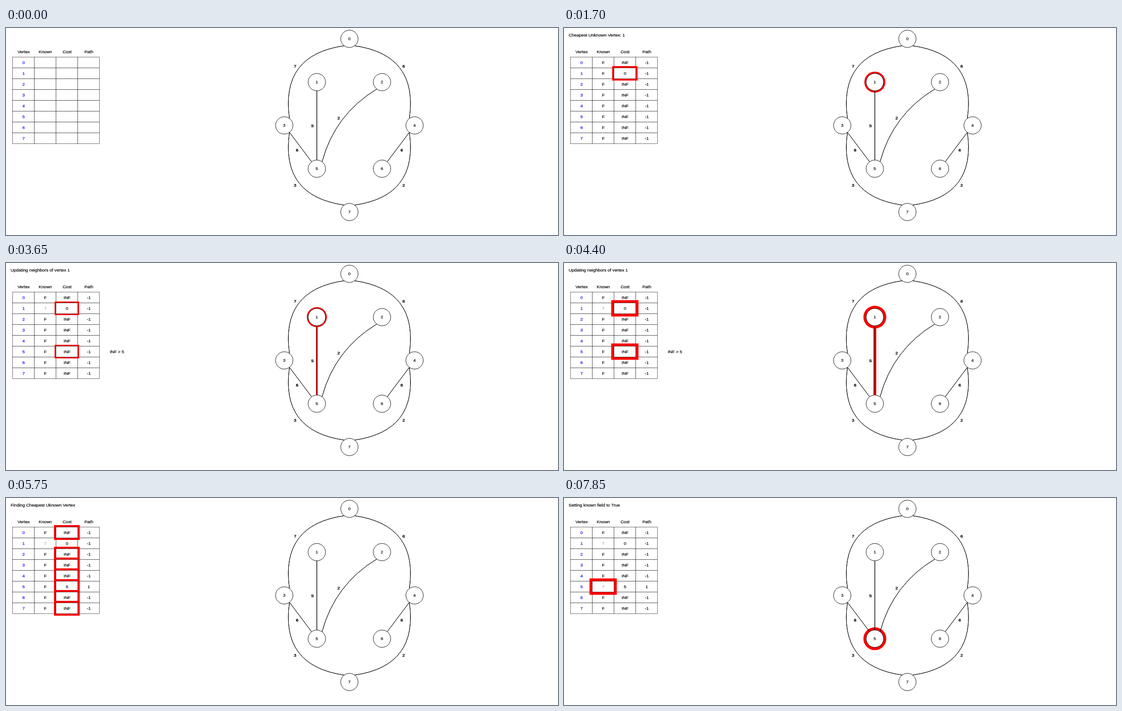
An HTML page with a canvas that plays this animation: 1220x459 px, repeating every 8 s.

```html
<!DOCTYPE html>
<html lang="en">
<head>
<meta charset="utf-8">
<title>Shortest path walkthrough</title>
<style>
  html, body { margin: 0; width: 100%; height: 100%; overflow: hidden; background: #fff; }
  canvas { display: block; }
</style>
</head>
<body>
<canvas id="stage" width="1220" height="459"></canvas>
<script>
const ctx = document.getElementById('stage').getContext('2d');

const LOOP = 8000, FIRST_TICK = 500, TICK = 150;
const PULSE = { period: 1720, peak: 1100, min: 3, max: 7 };
const SCALE = 0.96, RADIUS = 20 * SCALE;
const CELL = { x: 14.5, y: 64.5, w: 48, h: 24, line: 0.6 };
const KNOWN = 1, COST = 2;
const HEADERS = ['Vertex', 'Known', 'Cost', 'Path'];

const VERTICES = [[759, 24], [687, 120], [831, 120], [615, 216],
                  [903, 216], [687, 312], [831, 312], [759, 408]];

// from, to, weight, bend of the curve, side of the label
const EDGES = [
  [0, 3, 7, 0.5, 1], [0, 4, 6, -0.5, -1], [1, 5, 5, 0, 1], [2, 5, 2, 0.2, 1],
  [3, 5, 6, 0, 1], [3, 7, 3, 0.5, 1], [4, 6, 6, 0, -1], [4, 7, 2, -0.5, -1],
];

const costCells = rows => rows.map(row => [row, COST]);

const STEPS = [
  { at: 0, cells: [] },
  { at: 500, message: 'Finding Cheapest Uknown Vertex', cells: costCells([0, 1, 2, 3, 4, 5, 6, 7]) },
  { at: 1550, message: 'Cheapest Unknown Vertex: 1', cells: [[1, COST]], vertex: 1 },
  { at: 2600, message: 'Setting known field to True', cells: [[1, KNOWN]], vertex: 1, known: [1] },
  { at: 3650, message: 'Updating neighbors of vertex 1', cells: costCells([1, 5]), vertex: 1,
    known: [1], edge: 2, note: 'INF > 5' },
  { at: 4850, message: 'Finding Cheapest Uknown Vertex', cells: costCells([0, 2, 3, 4, 5, 6, 7]),
    known: [1], updated: true },
  { at: 5900, message: 'Cheapest Unknown Vertex: 5', cells: [[5, COST]], vertex: 5,
    known: [1], updated: true },
  { at: 6950, message: 'Setting known field to True', cells: [[5, KNOWN]], vertex: 5,
    known: [1, 5], updated: true },
];

function text(value, x, y, color = '#000', align = 'center') {
  ctx.save();
  ctx.fillStyle = ctx.strokeStyle = color;
  ctx.lineWidth = 0.2;
  ctx.textAlign = align;
  ctx.fillText(value, x, y + 3.4);
  ctx.strokeText(value, x, y + 3.4);
  ctx.restore();
}

function pulseAt(time) {
  const { period, peak, min, max } = PULSE;
  const phase = (((time - peak) % period) + period) % period;
  const distance = Math.min(phase, period - phase) / (period / 2);
  return (max - (max - min) * distance) * SCALE;
}

function cellText(row, col, step) {
  if (col === 0) return row;
  if (!step.message) return '';
  if (col === KNOWN) return step.known?.includes(row) ? 'T' : 'F';
  if (col === COST) return row === 1 ? 0 : row === 5 && step.updated ? 5 : 'INF';
  return row === 5 && step.updated ? 1 : '-1';
}

function drawCell(row, col, step, glow = 0) {
  const { w, h } = CELL, x = CELL.x + col * w, y = CELL.y + row * h;
  if (glow) {
    ctx.fillStyle = '#f00';
    ctx.fillRect(x - glow, y - glow, w + 2 * glow, h + 2 * glow);
  }
  ctx.fillStyle = '#fff';
  ctx.fillRect(x, y, w, h);
  ctx.lineWidth = CELL.line;
  ctx.strokeRect(x, y, w, h);
  const value = cellText(row, col, step);
  const color = col === 0 ? '#00f' : value === 'T' ? '#aaa' : '#000';
  text(value, x + w / 2 + 0.5, y + h / 2 + 0.5, color);
}

function disc(x, y, r, color) {
  ctx.beginPath();
  ctx.arc(x, y, r, 0, 2 * Math.PI);
  ctx.fillStyle = color;
  ctx.fill();
}

function drawVertex(index, glow) {
  const [x, y] = VERTICES[index];
  if (glow) disc(x, y, RADIUS + glow, '#f00');
  disc(x, y, RADIUS, '#fff');
  ctx.lineWidth = SCALE;
  ctx.stroke();
  text(index, x, y);
}

function drawEdge([from, to, weight, bend, side], glow) {
  const [ax, ay] = VERTICES[from], [bx, by] = VERTICES[to];
  const length = Math.hypot(bx - ax, by - ay);
  const ux = (bx - ax) / length, uy = (by - ay) / length;
  const span = length - 2 * RADIUS;
  const midX = (ax + bx) / 2, midY = (ay + by) / 2;
  const path = new Path2D();
  path.moveTo(ax + ux * RADIUS, ay + uy * RADIUS);
  path.quadraticCurveTo(midX - uy * span * bend, midY + ux * span * bend,
                        bx - ux * RADIUS, by - uy * RADIUS);
  const offset = span * bend / 2 + side * 10 * SCALE;

  // Each undirected edge is a pair of overlapping lines with their labels.
  for (let pass = 0; pass < 2; pass++) {
    if (glow) {
      ctx.strokeStyle = '#f00';
      ctx.lineWidth = glow;
      ctx.stroke(path);
    }
    ctx.strokeStyle = '#000';
    ctx.lineWidth = SCALE;
    ctx.stroke(path);
    text(weight, midX - uy * offset, midY + ux * offset + 1);
  }
}

function draw(time) {
  const tick = time < FIRST_TICK ? 0
    : FIRST_TICK + TICK * Math.floor((time - FIRST_TICK) / TICK);
  const step = STEPS.findLast(s => s.at <= tick);
  const glow = pulseAt(tick);

  ctx.fillStyle = '#fff';
  ctx.fillRect(0, 0, 1220, 459);
  ctx.font = '9.6px "Liberation Sans", Arial, sans-serif';
  ctx.strokeStyle = '#000';

  text(step.message ?? '', 10.3, 16, '#000', 'left');
  HEADERS.forEach((name, col) => text(name, 39 + col * CELL.w, 53));
  for (let row = 0; row < VERTICES.length; row++)
    for (let col = 0; col < HEADERS.length; col++) drawCell(row, col, step);
  step.cells.forEach(([row, col]) => drawCell(row, col, step, glow));
  if (step.note) text(step.note, 229.4, 197, '#000', 'left');

  VERTICES.forEach((_, i) => drawVertex(i, i === step.vertex ? glow : 0));
  EDGES.forEach((edge, i) => drawEdge(edge, i === step.edge ? glow : 0));
}

const start = performance.now();
function loop() {
  draw((performance.now() - start) % LOOP);
  requestAnimationFrame(loop);
}
loop();
</script>
</body>
</html>
```
